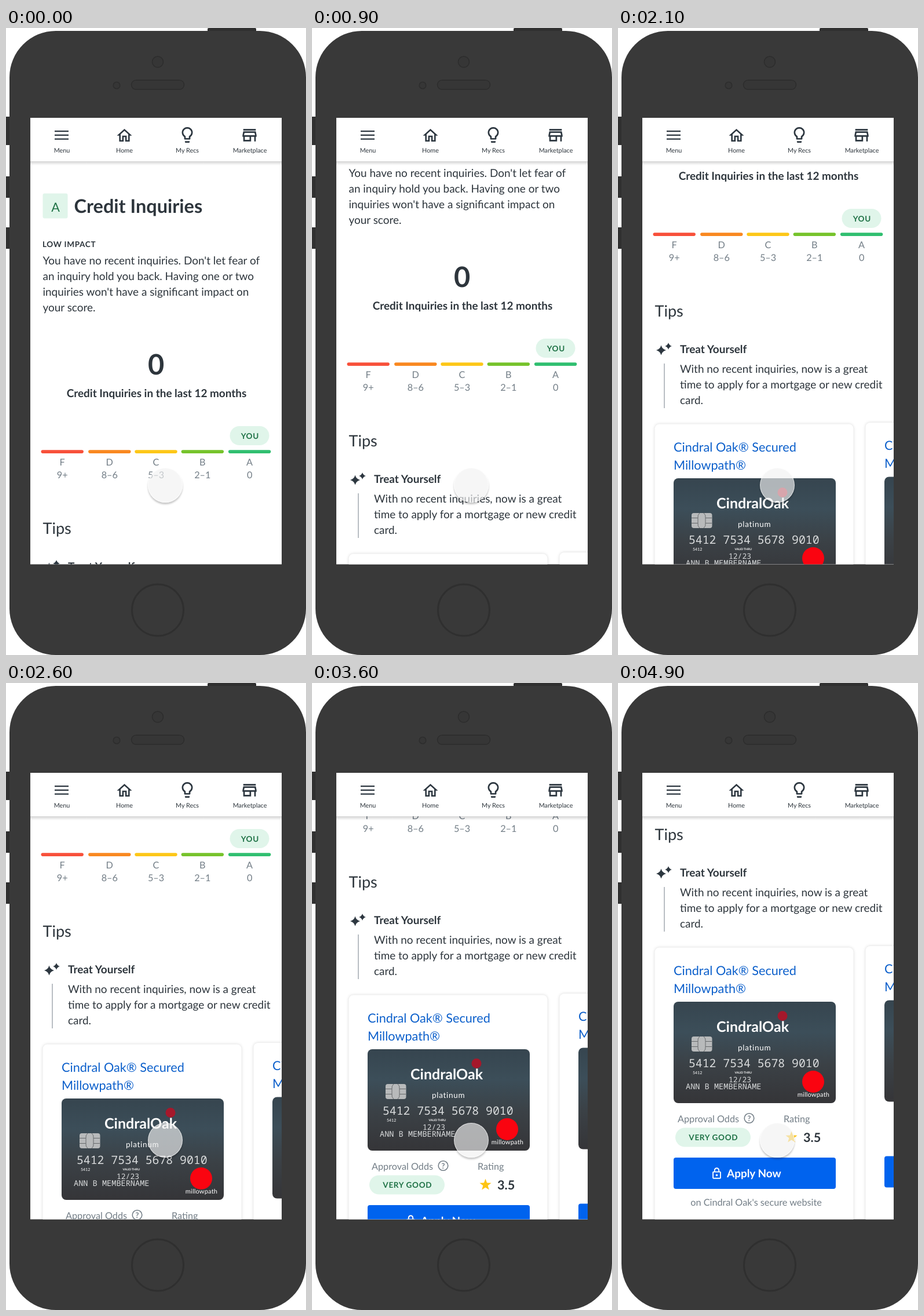
An HTML page that plays this animation: 518x1082 px, repeating every 9.9 s.

```html
<!DOCTYPE html>
<html lang="en">
<head>
<meta charset="utf-8">
<title>Credit Inquiries</title>
<style>
html, body { margin: 0; width: 100%; height: 100%; overflow: hidden; background: #fff; }
body { position: relative; }
svg { display: block; position: absolute; left: 0; top: 0; }
text { font-family: Lato, sans-serif; fill: #2d353c; text-rendering: geometricPrecision; }
.mid { text-anchor: middle; }
.b { font-weight: 700; }
.xs { font-size: 10.82px; }
.cap { font-size: 13.53px; font-weight: 700; letter-spacing: .68px; }
.sm { font-size: 16.24px; }
.md { font-size: 18.94px; }
.lg { font-size: 21.65px; }
.grey { fill: #737e87; }
.green { fill: #1f7246; }
.link { fill: #0b5fcb; }
.white text, text.white { fill: #fff; }
.mono { font-family: "Noto Sans Mono", "DejaVu Sans Mono", monospace; fill: #d9dbdc; }
.pill { fill: #e0f5ea; }
.panel { fill: #fff; filter: drop-shadow(0 0 2.5px rgba(0, 0, 0, .16)); }
.icon { fill: #2d3740; }
.button { fill: #0063ee; }
.dent { fill: #363636; stroke: #2d2d2d; stroke-width: 1.5; }
#touch {
  position: absolute; left: 245px; top: 759px; width: 60px; height: 60px;
  box-sizing: border-box; border-radius: 50%;
  border: 1.5px solid rgba(255, 255, 255, .6);
  background: rgba(241, 241, 241, .65);
  box-shadow: 0 3px 3px rgba(0, 0, 0, .22);
}
</style>
</head>
<body>
<svg width="518" height="1082" viewBox="0 0 518 1082">
  <defs>
    <clipPath id="screen"><path d="M42 155H476V925.5H42z"/></clipPath>
    <linearGradient id="steel" x2="0" y2="1">
      <stop offset="0" stop-color="#36454f"/>
      <stop offset=".3" stop-color="#3c4e59"/>
      <stop offset=".62" stop-color="#3b4146"/>
      <stop offset="1" stop-color="#353538"/>
    </linearGradient>
    <linearGradient id="fade" x2="0" y2="1">
      <stop offset="0" stop-opacity=".17"/>
      <stop offset="1" stop-opacity="0"/>
    </linearGradient>
  </defs>

  <!-- phone -->
  <g fill="#303030">
    <rect x="348" width="84" height="12" rx="2"/>
    <rect x="-3" y="153" width="12" height="49" rx="2"/>
    <rect x="-3" y="256" width="12" height="37" rx="2"/>
    <rect x="-3" y="344" width="12" height="37" rx="2"/>
  </g>
  <rect x="6" y="5" width="512" height="1077" rx="80" fill="#393939"/>
  <g class="dent">
    <circle cx="262" cy="58.5" r="9.5"/>
    <circle cx="191" cy="99" r="5.8"/>
    <rect x="216.5" y="90" width="91" height="16" rx="8"/>
  </g>
  <circle cx="262" cy="1004.5" r="44.5" fill="none" stroke="#2f2f2f" stroke-width="3"/>

  <g clip-path="url(#screen)">
    <path d="M42 155H476V926H42z" fill="#fff"/>

    <!-- scrolling page -->
    <g id="page">
      <rect class="pill" x="63.5" y="285.500" width="43" height="43" rx="3"/>
      <text class="lg mid green" x="85.500" y="316.500">A</text>
      <text class="b" x="117.500" y="319" font-size="32.47">Credit Inquiries</text>
      <text class="cap" x="63" y="377.500">LOW IMPACT</text>
      <g class="md">
        <text x="63.500" y="407.500">You have no recent inquiries. Don't let fear of</text>
        <text x="63.500" y="434.500">an inquiry hold you back. Having one or two</text>
        <text x="63.500" y="461.600">inquiries won't have a significant impact on</text>
        <text x="63.500" y="488.600">your score.</text>
      </g>
      <text class="b mid" x="259" y="598" font-size="48.7">0</text>
      <text class="b md mid" x="260" y="636.500">Credit Inquiries in the last 12 months</text>

      <rect class="pill" x="386.500" y="687" width="68" height="33" rx="16.500"/>
      <text class="cap mid green" x="421.300" y="708.500">YOU</text>
      <g id="scale"></g>

      <text x="63.500" y="873" font-size="27.06">Tips</text>
      <path class="icon" d="M74.500 922.500q1.800 6.700 8.500 8.500q-6.700 1.800-8.500 8.500q-1.800-6.700-8.500-8.500q6.700-1.800 8.500-8.500zM87 918q1.300 4.700 6 6q-4.700 1.300-6 6q-1.300-4.700-6-6q4.700-1.300 6-6z"/>
      <text class="b md" x="107" y="935.500">Treat Yourself</text>
      <path d="M80 954V1031" stroke="#b9bec3" stroke-width="2"/>
      <g class="md">
        <text x="107" y="969.500">With no recent inquiries, now is a great</text>
        <text x="107" y="996.600">time to apply for a mortgage or new credit</text>
        <text x="107" y="1023.600">card.</text>
      </g>

      <!-- offer -->
      <rect class="panel" x="63.500" y="1058.500" width="343" height="520" rx="8"/>
      <text class="lg link" x="96" y="1105.500">Cindral Oak® Secured</text>
      <text class="lg link" x="96" y="1136.500">Millowpath®</text>
      <rect x="96" y="1152" width="280" height="175" rx="8" fill="url(#steel)"/>
      <circle cx="284" cy="1176.500" r="8.500" fill="#a5182b"/>
      <rect x="127" y="1212" width="35.500" height="26" rx="4" fill="#b8babb"/>
      <path d="M127 1220.500h11v9h-11M162 1220.500h-11v9h11M138 1220.500q-1-5 3-8.500M151 1220.500q1-5-3-8.500M138 1229.500q-1 5 3 8.500M151 1229.500q1 5-3 8.500" fill="none" stroke="#66696b"/>
      <g class="white">
        <text class="b" x="170" y="1204" font-size="25">CindralOak</text>
        <text x="207" y="1235.500" font-size="13.500" letter-spacing=".7">platinum</text>
        <text x="129" y="1277.300" font-size="7">5412</text>
        <text class="b" x="201.500" y="1275.500" font-size="5">VALID THRU</text>
        <text class="mid" x="337.500" y="1316.300" font-size="11" letter-spacing=".2">millowpath</text>
      </g>
      <text class="mono" x="122" y="1264.500" font-size="19.8">5412 7534 5678 9010</text>
      <text class="mono" x="191" y="1290.500" font-size="13">12/23</text>
      <text class="mono" x="117" y="1303.300" font-size="13.600">ANN B MEMBERNAME</text>
      <circle cx="337" cy="1290" r="19" fill="#fa0410"/>

      <text class="sm grey" x="103" y="1359.500">Approval Odds</text>
      <circle cx="226.500" cy="1353" r="8.300" fill="none" stroke="#737e87" stroke-width="1.600"/>
      <text class="b mid grey" x="226.500" y="1357.700" font-size="13">?</text>
      <text class="sm grey" x="286" y="1359.500">Rating</text>
      <rect class="pill" x="99" y="1369.500" width="130" height="33" rx="16.500"/>
      <text class="cap mid green" x="164.800" y="1390.500">VERY GOOD</text>
      <path id="star" fill="#fdc413"/>
      <text class="b lg" x="320" y="1393.500">3.5</text>

      <rect class="button" x="96" y="1421" width="280" height="54" rx="4"/>
      <path fill="#fff" transform="translate(170.500 1448) scale(.92) translate(-12 -11.500)" d="M18 8h-1V6c0-2.760-2.240-5-5-5S7 3.240 7 6v2H6c-1.100 0-2 .9-2 2v10c0 1.100.9 2 2 2h12c1.100 0 2-.9 2-2V10c0-1.100-.9-2-2-2zM9 6c0-1.660 1.340-3 3-3s3 1.340 3 3v2H9V6zm9 14H6V10h12v10zm-6-3c1.100 0 2-.9 2-2s-.9-2-2-2-2 .9-2 2 .9 2 2 2z"/>
      <text class="b md white" x="188" y="1454.500">Apply Now</text>
      <text class="sm mid grey" x="238.500" y="1503.500">on Cindral Oak's secure website</text>

      <!-- next offer -->
      <rect class="panel" x="427.500" y="1056" width="343" height="520" rx="8"/>
      <text class="lg link" x="460" y="1103">Cindral Oak® Secured</text>
      <text class="lg link" x="460" y="1134">Millowpath®</text>
      <rect x="460" y="1149.500" width="280" height="175" rx="8" fill="url(#steel)"/>
      <rect class="button" x="460" y="1418.500" width="280" height="54" rx="4"/>
    </g>

    <!-- navigation -->
    <path d="M42 155H476V230H42z" fill="#fff"/>
    <path d="M42 230H476V237H42z" fill="url(#fade)"/>
    <g class="icon">
      <path d="M84 177h24v2.300h-24zm0 6.700h24v2.300h-24zm0 6.700h24v2.300h-24z"/>
      <path transform="translate(204.500 185) scale(1.3) translate(-12 -11.500)" d="M12 5.690l5 4.500V18h-2v-6H9v6H7v-7.810l5-4.500M12 3L2 12h3v8h6v-6h2v6h6v-8h3L12 3z"/>
      <g transform="translate(313 184.500) scale(1.353) translate(-12 -12)">
        <path d="M9 17v-2.800A6 6 0 1 1 15 14.200V17z" fill="none" stroke="#2d3740" stroke-width="2" stroke-linejoin="round"/>
        <path d="M9 20h6v1q0 1-1 1h-4q-1 0-1-1z"/>
      </g>
      <path transform="translate(420.500 185) scale(1.353) translate(-12 -12)" d="M18.360 9l.6 3H5.040l.6-3h12.720M20 4H4v2h16V4zm0 3H4l-1 5v2h1v6h10v-6h4v6h2v-6h1v-2l-1-5zM6 18v-4h6v4H6z"/>
    </g>
    <g class="xs mid">
      <text x="96.500" y="214.500">Menu</text>
      <text x="204.500" y="214.500">Home</text>
      <text x="313" y="214.500">My Recs</text>
      <text x="421" y="214.500">Marketplace</text>
    </g>
  </g>
</svg>
<div id="touch"></div>
<script>
const LOOP = 9900, STEP = 100;
const start = performance.now();
const $ = id => document.getElementById(id);

// grade scale: centre, colour, grade, range
$('scale').innerHTML = [
  [97.2, '#f8503a', 'F', '9+'],
  [178.8, '#f98820', 'D', '8–6'],
  [259, '#fdc718', 'C', '5–3'],
  [339.3, '#76c32b', 'B', '2–1'],
  [420.6, '#30bf70', 'A', '0']
].map(([x, color, grade, range]) => `
  <rect x="${x - 36.7}" y="728.3" width="73.4" height="5.6" rx="2.8" fill="${color}"/>
  <text class="sm mid grey" x="${x}" y="755">${grade}</text>
  <text class="sm mid grey" x="${x}" y="777">${range}</text>`).join('');

const star = [...Array(10).keys()].map(i => {
  const r = i % 2 ? 4.4 : 10.6, a = i * Math.PI / 5;
  return [299.5 + r * Math.sin(a), 1386 - r * Math.cos(a)].map(v => v.toFixed(2));
});
$('star').setAttribute('d', `M${star.join('L')}z`);

// scroll curve: time and distance, joined by a monotone cubic
const keys = [[0, 0], [900, 151], [1600, 296], [2600, 435], [3200, 477], [4100, 569], [4900, 602]];
const last = keys.length - 1;
const rate = i => (keys[i + 1][1] - keys[i][1]) / (keys[i + 1][0] - keys[i][0]);
const slope = keys.map((_, i) => {
  if (i === 0) return .13;
  if (i === last) return .02;
  const a = rate(i - 1), b = rate(i);
  return 2 * a * b / (a + b);
});

function scrollAt(t) {
  if (t >= keys[last][0]) return keys[last][1];
  const i = keys.findIndex((k, n) => t < keys[n + 1][0]);
  const [t0, y0] = keys[i], [t1, y1] = keys[i + 1];
  const d = t1 - t0, u = (t - t0) / d, v = 1 - u;
  return v * v * ((1 + 2 * u) * y0 + u * d * slope[i])
       + u * u * ((1 + 2 * v) * y1 - v * d * slope[i + 1]);
}

function draw() {
  const t = Math.max(0, performance.now() - start) % LOOP;
  const y = Math.round(scrollAt(Math.floor(t / STEP) * STEP));
  $('page').setAttribute('transform', `translate(0 ${-y})`);
  requestAnimationFrame(draw);
}
draw();
</script>
</body>
</html>
```
